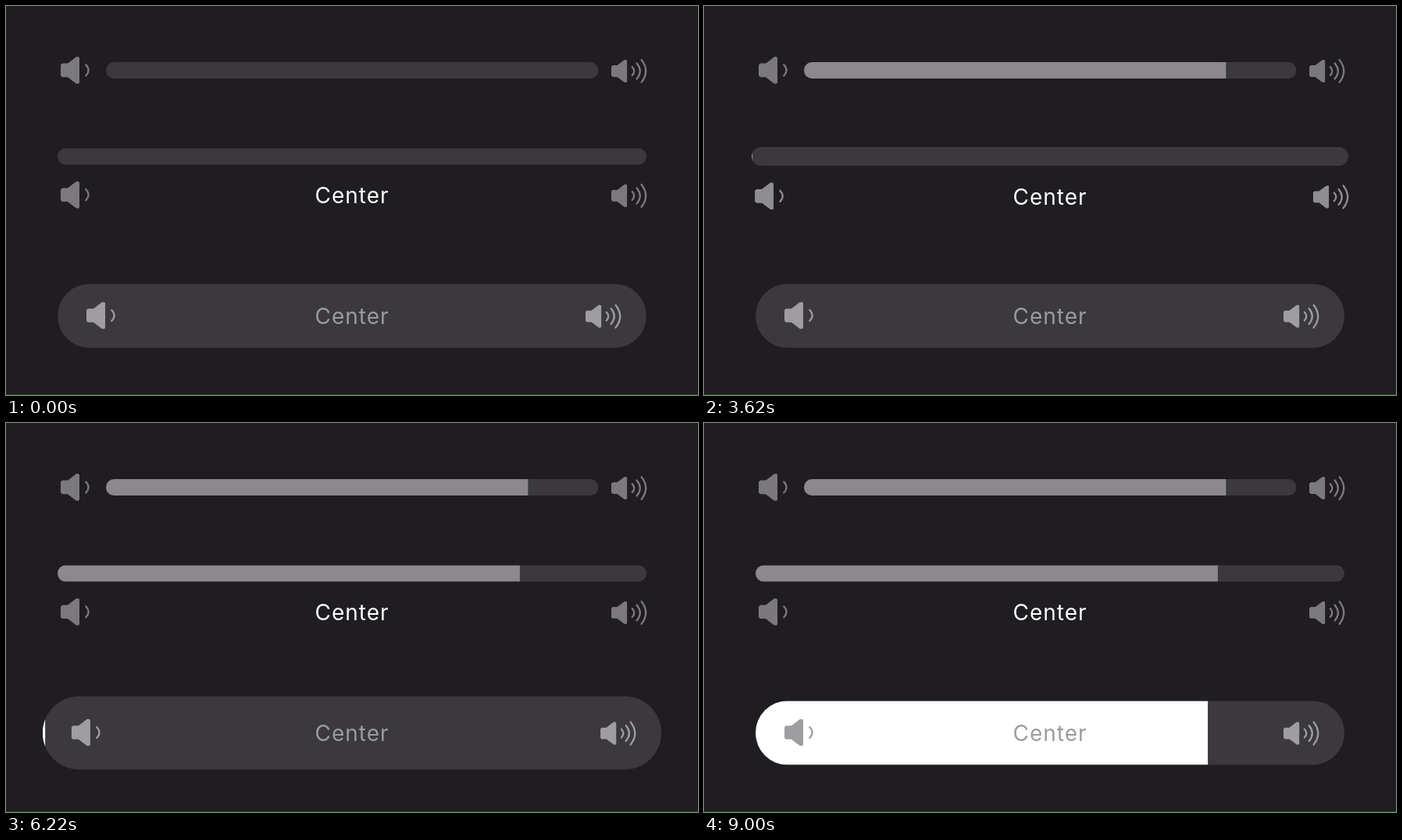
Animation of 886x499 px, one loop 9080 ms. Source, as an HTML page with a canvas:

```html
<!DOCTYPE html>
<html lang="en">
<head>
<meta charset="utf-8">
<title>Volume sliders</title>
<style>
  html, body { margin: 0; width: 100%; height: 100%; overflow: hidden; background: #1f1d21; }
  canvas { display: block; }
</style>
</head>
<body>
<canvas id="stage" width="886" height="499"></canvas>
<script>
const ctx = document.getElementById('stage').getContext('2d');
const LOOP = 9080;
const GROW = 33;

const sliders = [
  { press: 1282, release: 2640, drags: [[1320, 2430, 0.857]],
    left: 128, right: 758.5, middle: 82.5, height: 21, grown: 41.5,
    iconLeft: 70, iconRight: 775, iconY: 82.4, fill: [139, 255], icon: [123, 255] },
  { press: 3581, release: 5245, drags: [[3580, 5080, 0.785]],
    left: 66, right: 820, middle: 193, height: 21, grown: 41.5,
    iconLeft: 70, iconRight: 775, iconY: 242.3, fill: [139, 255], icon: [123, 255],
    sinks: true, label: '#fff', baseline: 253 },
  { press: 6119, release: 8220, drags: [[6160, 7520, 0.824], [7760, 8200, 0.768]],
    left: 66, right: 820, middle: 397.5, height: 82, grown: 103,
    iconLeft: 103, iconRight: 742, iconY: 397, fill: [255, 255], icon: [159, 159],
    label: '#9c9b9f', baseline: 408 }
];

const mix = (a, b, k) => a + (b - a) * k;
const clamp = k => Math.min(1, Math.max(0, k));
const easeSine = k => (1 - Math.cos(Math.PI * clamp(k))) / 2;

// Slightly underdamped step response.
function spring(ms) {
  if (ms <= 0) return 0;
  const damping = 0.72, angle = 0.016 * ms;
  const root = Math.sqrt(1 - damping * damping);
  return 1 - Math.exp(-damping * angle) *
    (Math.cos(root * angle) + damping / root * Math.sin(root * angle));
}

function grey([from, to], k) {
  const v = Math.round(mix(from, to, clamp(k)));
  return v === 255 ? '#fff' : `rgb(${v},${v - 2},${v + 1})`;
}

function valueAt(drags, t) {
  return drags.reduce((value, [start, end, target]) =>
    mix(value, target, easeSine((t - start) / (end - start))), 0);
}

function speaker(scale) {
  ctx.save();
  ctx.scale(scale, scale);
  ctx.lineWidth = 3;
  ctx.beginPath();
  ctx.moveTo(1.5, -6.3);
  ctx.lineTo(2.6, -7.3);
  ctx.lineTo(9.5, -7.3);
  ctx.lineTo(20.6, -15.8);
  ctx.lineTo(22.5, -15.6);
  ctx.lineTo(22.5, 15.6);
  ctx.lineTo(20.6, 15.8);
  ctx.lineTo(9.5, 7.3);
  ctx.lineTo(2.6, 7.3);
  ctx.lineTo(1.5, 6.3);
  ctx.closePath();
  ctx.fill();
  ctx.stroke();
  ctx.restore();
}

function wave(x, half, bulge) {
  ctx.beginPath();
  ctx.moveTo(x, -half);
  ctx.quadraticCurveTo(x + 2 * bulge, 0, x, half);
  ctx.stroke();
}

function icon(x, y, color, scale, waves) {
  ctx.save();
  ctx.translate(x, y);
  ctx.fillStyle = ctx.strokeStyle = color;
  ctx.lineCap = ctx.lineJoin = 'round';
  speaker(scale);
  ctx.lineWidth = 2.3;
  waves.forEach(w => wave(...w));
  ctx.restore();
}

function drawSlider(s, t) {
  const open = spring(t - s.press) - spring(t - s.release);
  const shift = GROW * open;
  const height = mix(s.height, s.grown, open);
  const outward = s.iconLeft < s.left ? -shift : shift;
  const x = s.left - shift;
  const width = s.right - s.left + 2 * Math.abs(outward);
  const top = s.middle - height / 2;
  const sink = s.sinks ? (height - s.height) / 2 : 0;

  ctx.save();
  ctx.beginPath();
  ctx.roundRect(x, top, width, height, height / 2);
  ctx.fillStyle = '#3b393d';
  ctx.fill();
  ctx.clip();
  ctx.fillStyle = grey(s.fill, open);
  ctx.fillRect(x, top, width * valueAt(s.drags, t), height);
  ctx.restore();

  const color = grey(s.icon, open);
  const y = s.iconY + sink;
  icon(s.iconLeft - shift, y, color, 1, [[32.3, 7, 3.4]]);
  icon(s.iconRight + shift, y + 1.1, color, 0.84,
    [[26.8, 5.4, 2.5], [32.6, 10, 4.2], [38.6, 14.4, 5.6]]);

  if (s.label) {
    ctx.fillStyle = s.label;
    ctx.fillText('Center', 443, s.baseline + sink);
  }
}

function draw(now) {
  const t = now % LOOP;
  ctx.fillStyle = '#1f1d21';
  ctx.fillRect(0, 0, 886, 499);
  ctx.fillStyle = '#0a5c0d';
  ctx.fillRect(0, 498, 886, 1);
  ctx.font = '28px Inter, sans-serif';
  ctx.letterSpacing = '1px';
  ctx.textAlign = 'center';
  sliders.forEach(s => drawSlider(s, t));
}

const start = performance.now();
function tick() {
  draw(performance.now() - start);
  requestAnimationFrame(tick);
}
tick();
</script>
</body>
</html>
```
